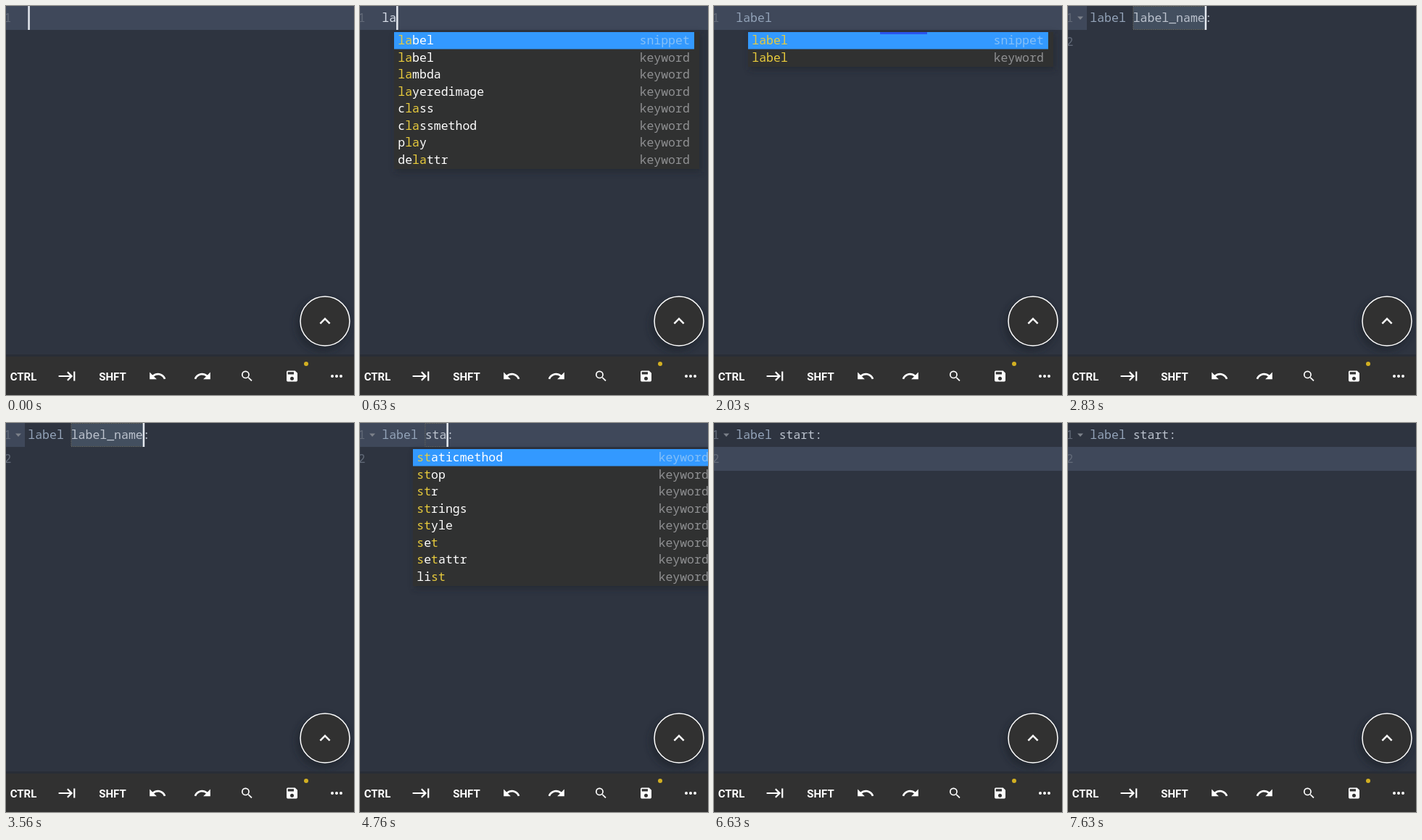
These frames come from a looping animation (480x537 px, 8 s). An HTML page:

```html
<!DOCTYPE html>
<html>
<head>
<meta charset="utf-8">
<style>
html, body { margin: 0; width: 100%; height: 100%; overflow: hidden; background: #2e3440; }
svg { display: block; }
text { white-space: pre; }
.code { font: 16.5px "Noto Sans Mono", "DejaVu Sans Mono", monospace; }
.keys { font: bold 15px Roboto, sans-serif; fill: #fff; text-anchor: middle; }
.icons { fill: #fff; }
.hit { fill: #e8cb3c; }
</style>
</head>
<body>
<svg width="480" height="537" viewBox="0 0 480 537">
  <defs>
    <filter id="soft" x="-30%" y="-30%" width="160%" height="160%"><feGaussianBlur stdDeviation="4"/></filter>
  </defs>
  <rect width="480" height="537" fill="#2e3440"/>
  <g id="editor" class="code"></g>
  <circle cx="437" cy="440" r="37" fill="#1d222b" opacity=".6" filter="url(#soft)"/>
  <circle cx="440" cy="435" r="34" fill="#313131" stroke="#fff" stroke-width="1.5"/>
  <rect y="481" width="480" height="4" fill="#282d36"/>
  <rect y="484" width="480" height="53" fill="#313131"/>
  <g class="keys"><text x="24" y="516.5">CTRL</text><text x="147" y="516.5">SHFT</text></g>
  <g class="icons" id="icons"></g>
  <circle cx="414" cy="494" r="3" fill="#d3b021"/>
  <g id="touch">
    <circle cx="95" cy="505" r="18" fill="#8fa3bb" opacity=".45"/>
    <circle cx="95" cy="504.500" r="15" fill="#c9c5c6" stroke="#dfe4ea" stroke-width="1.5"/>
    <path d="M80 511h16M96 505v12" stroke="#a9b0dc" stroke-width="1.5" opacity=".7"/>
  </g>
</svg>
<script>
const LOOP = 8000, CHAR = 9.9, LEFT = 30.3, LINE = 33, ROW = 23.5;
const $ = id => document.getElementById(id);

// Toolbar icons on a 24 unit grid: centre x, centre y, size, path
const icons = [
  [84.5, 511, 26, "M11.59 7.41L15.17 11H1v2h14.17l-3.59 3.59L13 18l6-6-6-6zM20 6v12h2V6z"],
  [209, 511, 26, "M12.5 8c-2.65 0-5.05.99-6.9 2.6L2 7v9h9l-3.62-3.62c1.39-1.16 3.16-1.88 5.12-1.88 3.54 0 6.55 2.31 7.6 5.5l2.37-.78C21.08 11.03 17.15 8 12.500 8z"],
  [271, 511, 26, "M18.4 10.6C16.55 8.99 14.15 8 11.5 8c-4.65 0-8.58 3.03-9.96 7.22L3.9 16c1.05-3.19 4.05-5.5 7.6-5.5 1.95 0 3.73.72 5.12 1.88L13 16h9V7z"],
  [332.5, 511, 20, "M15.5 14h-.79l-.28-.27A6.5 6.5 0 1 0 13.73 14.43l.27.28v.79l5 4.99L20.49 19zM9.500 14a4.500 4.500 0 1 1 0-9 4.500 4.500 0 0 1 0 9z"],
  [394.5, 511, 20, "M17 3H5a2 2 0 0 0-2 2v14a2 2 0 0 0 2 2h14a2 2 0 0 0 2-2V7zM12 19a3 3 0 1 1 0-6 3 3 0 0 1 0 6zM15 9H5V5h10z"],
  [456, 511, 24, "M6 10a2 2 0 1 0 0 4 2 2 0 0 0 0-4zM12 10a2 2 0 1 0 0 4 2 2 0 0 0 0-4zM18 10a2 2 0 1 0 0 4 2 2 0 0 0 0-4z"],
  [440, 435, 30, "M12 8l-6 6 1.41 1.41L12 10.830l4.590 4.580L18 14z"]
];
$("icons").innerHTML = icons.map(([x, y, size, d]) =>
  `<path fill-rule="evenodd" transform="translate(${x - size / 2} ${y - size / 2}) scale(${size / 24})" d="${d}"/>`).join("");
const tabIcon = $("icons").firstChild;

// Keystrokes restart the caret blink
const strokes = [
  { at: -400, word: "" },
  { at: 300, word: "l" },
  { at: 560, word: "la" },
  { at: 960, word: "lab" },
  { at: 1230, word: "labe" },
  { at: 1500, word: "label" },
  { at: 2530, word: "label", name: "label_name", selected: true },
  { at: 4230, word: "label", name: "s" },
  { at: 4430, word: "label", name: "st" },
  { at: 4700, word: "label", name: "sta" },
  { at: 4930, word: "label", name: "star" },
  { at: 5130, word: "label", name: "start" },
  { at: 6130, word: "label", name: "start", done: true }
];

// Completion popup: query and its words, the first of "l" being a snippet
const lists = [
  { at: 0 },
  { at: 360, query: "l", words: "label label lambda layeredimage len list locals long" },
  { at: 600, query: "la", words: "label label lambda layeredimage class classmethod play delattr" },
  { at: 1000, query: "lab", words: "label label" },
  { at: 1270, query: "labe", words: "label label" },
  { at: 1540, query: "label", words: "label label" },
  { at: 2530 },
  { at: 4290, query: "s", words: "staticmethod stop str strings style set setattr list" },
  { at: 4490, query: "st", words: "staticmethod stop str strings style set setattr list" },
  { at: 4830, query: "sta", words: "staticmethod setattr" },
  { at: 4970, query: "star", words: "setattr" },
  { at: 5170 }
];

const current = (list, t) => list.filter(s => s.at <= t).pop();
const text = (x, y, str, fill) => `<text x="${x}" y="${y}" fill="${fill}">${str}</text>`;
const rect = (x, y, w, h, fill, more = "") =>
  `<rect x="${x}" y="${y}" width="${w}" height="${h}" fill="${fill}" ${more}/>`;

// Marks a contiguous match, or else the letters in sequence
function mark(word, query) {
  const hit = s => `<tspan class="hit">${s}</tspan>`;
  if (word.includes(query)) return word.replace(query, hit(query));
  let n = 0;
  return [...word].map(c => c === query[n] ? (n++, hit(c)) : c).join("");
}

function popup({ query, words }, t) {
  if (!query) return "";
  const isLabel = query[0] === "l", x = isLabel ? 47 : 73;
  const rows = words.split(" "), h = rows.length * ROW + 1;
  let out = rect(x + 2, 38, 421, h + 2, "#1d222b", 'opacity=".5" filter="url(#soft)"') +
    rect(x, 36, 421, h, "#303131") + rect(x, 36, 414, ROW, "#3399ff");
  rows.forEach((word, i) => {
    const y = 53 + i * ROW;
    out += text(x + 5.3, y, mark(word, query), "#fff") +
      text(x + 338.5, y, isLabel && !i ? "snippet" : "keyword", i ? "#8f9092" : "#86c0f7");
  });
  if (t > 1960 && t < 2300) out += rect(229, 36, 65, 3, "#2a55ee");
  return out;
}

function editor(t) {
  const s = current(strokes, t), { word, name } = s;
  const row = s.done ? 1 : 0, x = LEFT + 6 * CHAR;
  let out = rect(0, row * LINE, s.selected ? 26 : 480, LINE, "#3f485a");
  if (name && !s.done)
    out += rect(x + .2, .5, name.length * CHAR + .6, LINE - 1, s.selected ? "#434f5f" : "none",
      'stroke="#77735f" stroke-width="1" stroke-dasharray="1 1.5"');
  out += text(-2.5, 22, 1, "#626a78") +
    text(LEFT, 22, word, word === "label" ? "#93a3b8" : "#d8dee9");
  if (name)
    out += text(x, 22, name + ":", "#bcc3ce") + text(-2.5, 55, 2, "#626a78") +
      '<path d="M13 14.5h8l-4 4.500z" fill="#7c818a"/>';
  out += popup(current(lists, t), t);
  const column = s.done ? 4 : name ? 6 + name.length : word.length;
  if (Math.floor((t - s.at) / 500) % 2 === 0)
    out += rect(LEFT + column * CHAR, row * LINE, 2.5, LINE, "#e5e9f0");
  return out;
}

let shown;
function draw(now) {
  const t = now % LOOP, next = editor(t);
  if (next !== shown) $("editor").innerHTML = shown = next;
  const pressed = t >= 5830 && t < 6360;
  $("touch").style.display = pressed ? "" : "none";
  tabIcon.setAttribute("fill", pressed ? "#7f8cc4" : "#fff");
  requestAnimationFrame(draw);
}
draw(performance.now());
</script>
</body>
</html>
```
